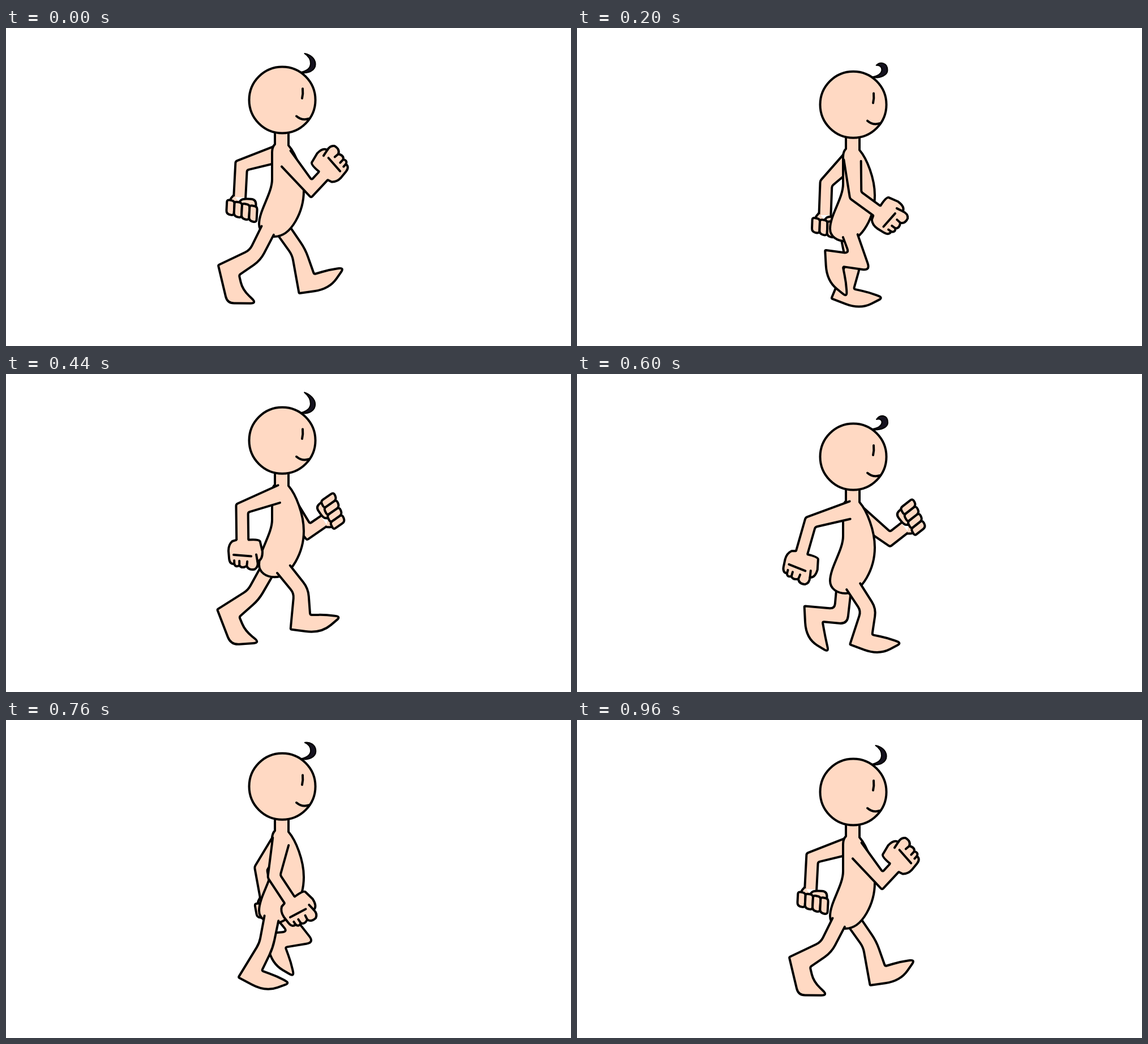
Write an HTML page with a canvas that moves like this. It is 998 px wide and 561 px high and loops after 1000 ms.

```html
<!DOCTYPE html>
<html lang="en">
<head>
<meta charset="utf-8">
<title>Walk cycle</title>
<style>
html, body { margin: 0; width: 100%; height: 100%; overflow: hidden; background: #fff; }
canvas { display: block; }
</style>
</head>
<body>
<canvas id="stage" width="998" height="561"></canvas>
<script>
const ctx = document.getElementById('stage').getContext('2d');
const SKIN = '#ffd9c3', INK = '#000', STRIDE = 960;

// Periodic smooth curve through evenly spaced values.
function curve(period, ...v) {
  const n = v.length, at = i => v[(i + n) % n];
  return time => {
    const u = time % period / period * n, i = Math.floor(u), s = u - i;
    const a = at(i), b = at(i + 1);
    const m = (b - at(i - 1)) / 2, k = (at(i + 2) - a) / 2;
    return a + s * (m + s * (3 * (b - a) - 2 * m - k + s * (2 * (a - b) + m + k)));
  };
}

// Two steps make one stride. Angles are in degrees from straight down, forward positive.
const headY = curve(STRIDE / 2, 127, 146, 127, 102);
const curl = curve(STRIDE / 2, .2, 1, .65, 0);
const thigh = curve(STRIDE, -27, -6, 31, 46, 35, 33, -1, -27);
const shin = curve(STRIDE, -60, -95, -93, -50, 14, -14, -23, -44);
const foot = curve(STRIDE, 43, 23, 22, 51, 114, 86, 84, 62);
const upperArm = curve(STRIDE, 40, 52, -19, -57, -72, -73, -28, 21);
const reach = curve(STRIDE, 83, 85, 61, 73, 74, 77, 62, 82);
const forearm = curve(STRIDE, 137, 128, 22, 8, -3, -16, 12, 84);

const mix = (a, b, k) => a + (b - a) * k;

// Point at a distance along a direction and sideways to its front.
function offset([x, y], deg, along, side = 0) {
  const r = deg * Math.PI / 180, s = Math.sin(r), c = Math.cos(r);
  return [x + along * s + side * c, y + along * c - side * s];
}

// Front and back edges of a two-bone limb, mitred at the joint.
function limb(root, a, len1, b, len2, top, width, startFront, startBack) {
  const joint = offset(root, a, len1), end = offset(joint, b, len2);
  const mitre = width / Math.cos((a - b) * Math.PI / 360);
  const edge = (side, start) => [
    offset(root, a, start, side * top),
    offset(joint, (a + b) / 2, 0, side * mitre),
    offset(end, b, 0, side * width)
  ];
  return { end, front: edge(1, startFront), back: edge(-1, startBack) };
}

// Open polyline whose inner corners are rounded by the given radii.
function rounded(pts, radii) {
  const path = new Path2D();
  const toward = (a, b, r) => {
    const len = Math.hypot(b[0] - a[0], b[1] - a[1]) || 1;
    const k = Math.min(r / len, .5);
    return [mix(a[0], b[0], k), mix(a[1], b[1], k)];
  };
  path.moveTo(...pts[0]);
  for (let i = 1; i < pts.length - 1; i++) {
    path.lineTo(...toward(pts[i], pts[i - 1], radii[i - 1]));
    path.quadraticCurveTo(...pts[i], ...toward(pts[i], pts[i + 1], radii[i - 1]));
  }
  path.lineTo(...pts[pts.length - 1]);
  return path;
}

function paint(path) {
  ctx.fill(path);
  ctx.stroke(path);
}

function leg(phase, y) {
  const a = thigh(phase), b = shin(phase), f = foot(phase), hip = [474, y + 207];
  const { end, front, back } = limb(hip, a, 75, b, 60 - .12 * Math.abs(a - b), 13, 12.5, 28, 24);
  // The foot rolls over its ball while pushing off.
  const roll = Math.max(0, Math.cos(phase / STRIDE * 2 * Math.PI)) ** 4;
  const sole = (along, depth) => offset(end, f, along, -depth);
  const line = rounded([
    back[0], back[1],
    sole(-19, 10 - 5 * roll),
    sole(33 + 8 * roll, 25 + 14 * roll),
    sole(72 + 5 * roll, 1),
    sole(48 - 6 * roll, -6 + 9 * roll),
    sole(19, -10),
    front[1], front[0]
  ], [9, 2, 34 - 22 * roll, 9 + 3 * roll, 16, 3, 14]);
  const fill = new Path2D(line);
  fill.lineTo(...offset(hip, a, 14));
  ctx.fill(fill);
  ctx.stroke(line);
}

const fist = new Path2D(
  'M0 11 L2 18 Q8 25 19 25 L33 24 Q43 23 42 15 Q49 13 45 6 Q51 2 46 -7 ' +
  'Q54 -10 52 -21 Q48 -28 38 -26 Q36 -35 21 -35 L3 -31 Q-1 -29 0 -11');
const creases = new Path2D(
  'M42 15 L36 15 M45 6 L37 6 M46 -7 L38 -8 M38 -26 L26 -24 M26 16 L29 -15');

function nearHand() {
  paint(fist);
  ctx.stroke(creases);
}

function farHand() {
  paint(rounded([[-3, 11], [6, 18], [22, 0], [24, -30], [2, -29], [2, -5], [8, 0]],
    [6, 4, 4, 9, 9]));
  for (let i = 0; i < 4; i++) {
    const v = 22 - 13.5 * i, w = v - 13.5, u = 5 + 2.6 * i, e = 30 + 3.3 * i;
    paint(rounded([[u + 8, v], [e, v], [e + 3, w], [u + 2, w], [u, v], [u + 8, v]],
      [6, 6, 5, 5]));
  }
}

function arm(phase, y, hand) {
  const a = upperArm(phase), b = forearm(phase);
  const tuck = 30 * Math.max(0, Math.sin(a * Math.PI / 180));
  const { end, front, back } = limb([486, y + 93], a, reach(phase),
    b, 56 - .18 * Math.max(0, b), 15, 10.5, 8, tuck);
  ctx.fill(rounded([...front, ...back.slice().reverse()], [0, 0, 0, 0]));
  ctx.stroke(rounded(front, [3]));
  ctx.stroke(rounded(back, [3]));
  ctx.save();
  ctx.translate(...end);
  ctx.rotate(Math.PI / 2 - b * Math.PI / 180);
  hand();
  ctx.restore();
}

const torso = new Path2D(
  'M475 55 V78 Q470 83 470 92 V140 C470 165 447 195 447 219 ' +
  'C447 233 460 241 474 241 C505 241 526 195 526 160 C526 130 512 95 499 80 V55');
const face = new Path2D('M524 -20 Q525 -11 523 -3 M513 28.5 Q523 37 535 33');
const skull = new Path2D();
skull.arc(488, 0, 58.5, 0, Math.PI * 2);

function hair(k) {
  const at = (x0, y0, x1 = x0, y1 = y0) => [488 + mix(x0, x1, k), mix(y0, y1, k)];
  ctx.beginPath();
  ctx.moveTo(...at(32, -48));
  ctx.bezierCurveTo(...at(49, -46), ...at(58, -54, 61, -52), ...at(58, -64, 61, -60));
  ctx.bezierCurveTo(...at(58, -73, 61, -75), ...at(49, -82, 47, -75), ...at(39, -86, 41, -66));
  ctx.bezierCurveTo(...at(52, -74, 54, -70), ...at(57, -55, 56, -51), ...at(33, -49));
  ctx.fillStyle = '#15121f';
  ctx.lineWidth = 2;
  ctx.fill();
  ctx.stroke();
}

// Runs a drawing step with the head's centre line as origin.
function atHead(y, step) {
  ctx.save();
  ctx.translate(0, y);
  step();
  ctx.restore();
}

function draw(phase) {
  const y = headY(phase), far = phase + STRIDE / 2;
  ctx.fillStyle = '#fff';
  ctx.fillRect(0, 0, 998, 561);
  ctx.fillStyle = SKIN;
  ctx.strokeStyle = INK;
  ctx.lineWidth = 4;
  ctx.lineCap = ctx.lineJoin = 'round';

  arm(far, y, farHand);
  leg(far, y);
  atHead(y, () => paint(torso));
  leg(phase, y);
  arm(phase, y, nearHand);
  atHead(y, () => {
    paint(skull);
    ctx.stroke(face);
    hair(curl(phase));
  });
}

function tick() {
  const step = Math.floor(performance.now() % 1000 / 40) * 40;
  draw(step % STRIDE);
  requestAnimationFrame(tick);
}
tick();
</script>
</body>
</html>
```
